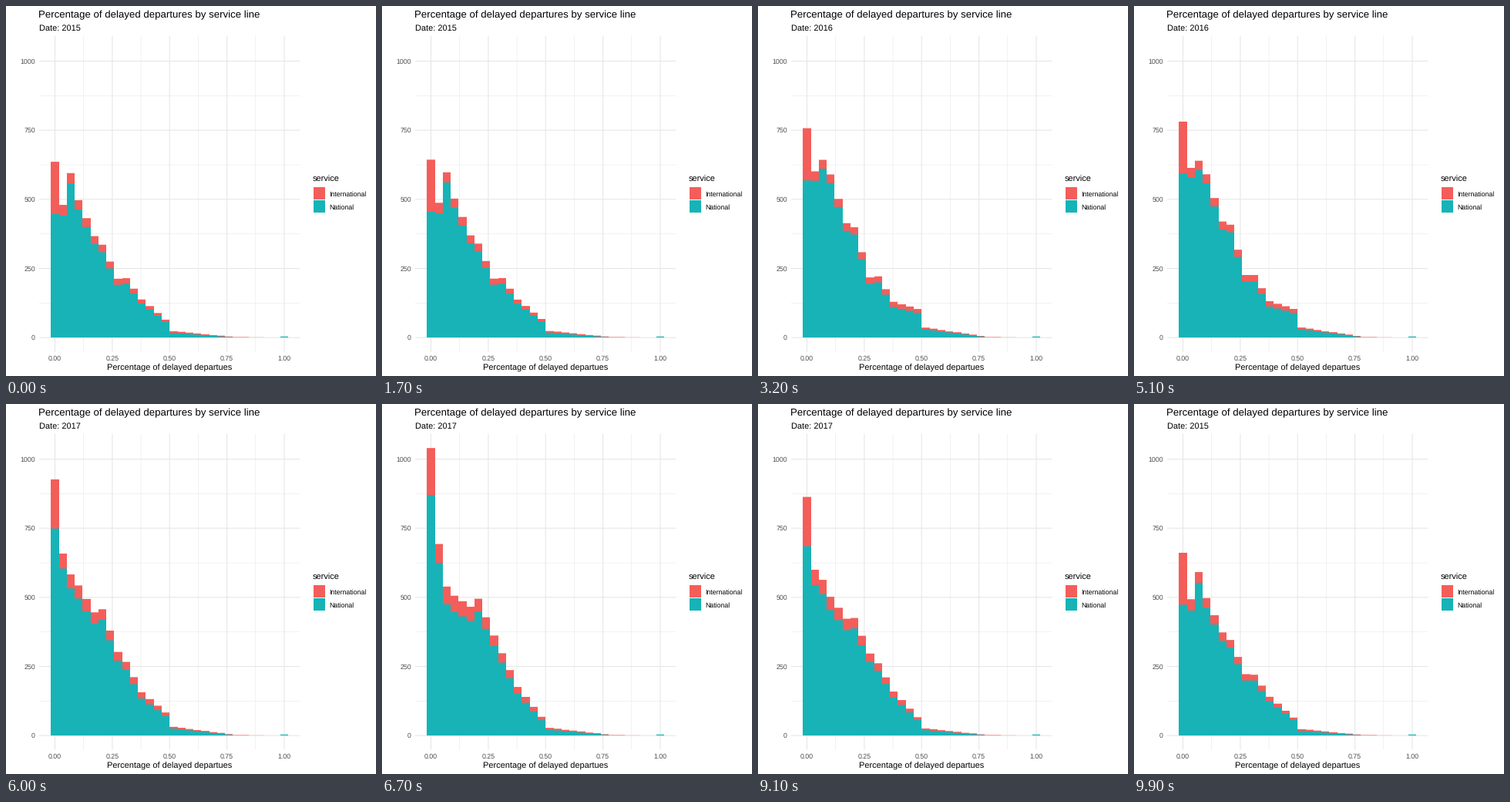
Recreate the animation shown at these times as a matplotlib script. Size 480 px wide and 480 px high, loop 10 s.

```python
import numpy as np
import matplotlib.pyplot as plt
from matplotlib.animation import FuncAnimation
from matplotlib.patches import Polygon, Rectangle

plt.rcParams["font.family"] = "Liberation Sans"
plt.rcParams["text.hinting"] = "none"

SIZE, DPI = 480, 100
FRAMES, INTERVAL = 100, 100
RED, TEAL, GRID = "#F35E5A", "#17B3B7", "#E6E6E6"
LEFT, RIGHT, TOP, BOTTOM = 43, 381.4, 38.7, 448.4
BINS, BASE, HALF = 30, 430, 15
K = np.arange(BINS)

YEARS = [2015, 2016, 2017]
# (last still frame, length of the move, from state, to state)
MOVES = [(16, 17, 0, 1), (50, 17, 1, 2), (84, 16, 2, 0)]

# Bins where the national curve bends below one half
KNOTS = [0, 1, 2, 3, 5, 6, 8, 9, 11, 14]


def national(heights, tail):
    """Bent slope up to one half, then a low ramp and a last small bar."""
    body = np.interp(K, KNOTS, heights)
    ramp = np.clip(tail * (1 - (K - HALF) / 8), 0, None)
    counts = np.where(K < HALF, body, ramp)
    counts[-1] = 4
    return np.round(counts)


def foreign(first, start, end):
    """One tall bar, a straight decline, then a thin tail."""
    body = np.interp(K, [1, HALF - 1], [start, end])
    tail = np.clip(6 * (1 - (K - HALF) / 12), 0, None)
    counts = np.where(K < HALF, body, tail)
    counts[0] = first
    return np.round(counts)


COUNTS = np.array([
    [national([447, 441, 558, 463, 338, 309, 191, 195, 123, 57], 17),
     national([576, 575, 614, 565, 389, 377, 195, 200, 110, 92], 31),
     national([870, 625, 475, 447, 415, 449, 324, 264, 151, 56], 22)],
    [foreign(189, 39, 8), foreign(189, 34, 14), foreign(170, 68, 12)],
])


def px(share):
    return 63.5 + 297.5 * share


def py(count):
    return 430.2 - 0.3587 * count


EDGES = np.round(px((np.arange(BINS + 1) - 0.5) / (BINS - 1)))


def outline(counts):
    tops = np.minimum(py(counts), BASE)
    xs = np.repeat(EDGES, 2)
    ys = np.concatenate([[BASE], np.repeat(tops, 2), [BASE]])
    return np.column_stack([xs, ys])


fig = plt.figure(figsize=(SIZE / DPI, SIZE / DPI), dpi=DPI, facecolor="white")
ax = fig.add_axes([0, 0, 1, 1])
ax.set_xlim(0, SIZE)
ax.set_ylim(SIZE, 0)
ax.axis("off")


def line(xs, ys, width):
    ax.plot(xs, ys, color=GRID, lw=width * 72 / DPI, snap=False,
            solid_capstyle="butt", zorder=1)


def label(x, y, text, size=11, color="black", ha="left"):
    return ax.text(x, y, text, fontsize=size * 72 / DPI, color=color,
                   ha=ha, va="baseline", zorder=4)


def draw_grid():
    for k in range(9):
        width = 0.53 if k % 2 else 1.07
        x, y = px(k / 8), py(k * 125)
        line([x, x], [TOP, BOTTOM], width)
        line([LEFT, RIGHT], [y, y], width)
        if k % 2 == 0:
            label(x, 460, f"{k / 8:.2f}", 8.8, "#4D4D4D", "center")
            label(38, y + 3.2, str(k * 125), 8.8, "#4D4D4D", "right")


def draw_legend():
    label(397.6, 228, "service")
    for y, color, name in [(235, RED, "International"), (252, TEAL, "National")]:
        ax.add_patch(Rectangle((399, y), 15, 16, fc=color, lw=0, snap=False))
        label(419.6, y + 12, name, 8.8)


draw_grid()
draw_legend()
label(42.4, 15, "Percentage of delayed departures by service line", 13.2)
label(212.2, 473, "Percentage of delayed departues", ha="center")
date = label(42.6, 32, "")

flat = outline(np.zeros(BINS))
upper = ax.add_patch(Polygon(flat, fc=RED, lw=0, snap=False, zorder=2))
lower = ax.add_patch(Polygon(flat, fc=TEAL, lw=0, snap=False, zorder=3))


def state_at(frame):
    """Counts of both services and the nearest year."""
    a, b, p = 0, 0, 0.0
    for start, length, old, new in MOVES:
        if frame > start:
            a, b, p = old, new, min((frame - start) / length, 1)
    counts = COUNTS[:, a] * (1 - p) + COUNTS[:, b] * p
    return counts, YEARS[b if p >= 0.5 else a]


def update(frame):
    (home, abroad), year = state_at(frame)
    upper.set_xy(outline(np.where(abroad > 0.2, home + abroad, 0)))
    lower.set_xy(outline(home))
    date.set_text(f"Date: {year}")
    return upper, lower, date


anim = FuncAnimation(fig, update, frames=FRAMES, interval=INTERVAL,
                     init_func=lambda: update(0), repeat=True)
plt.show()
```
